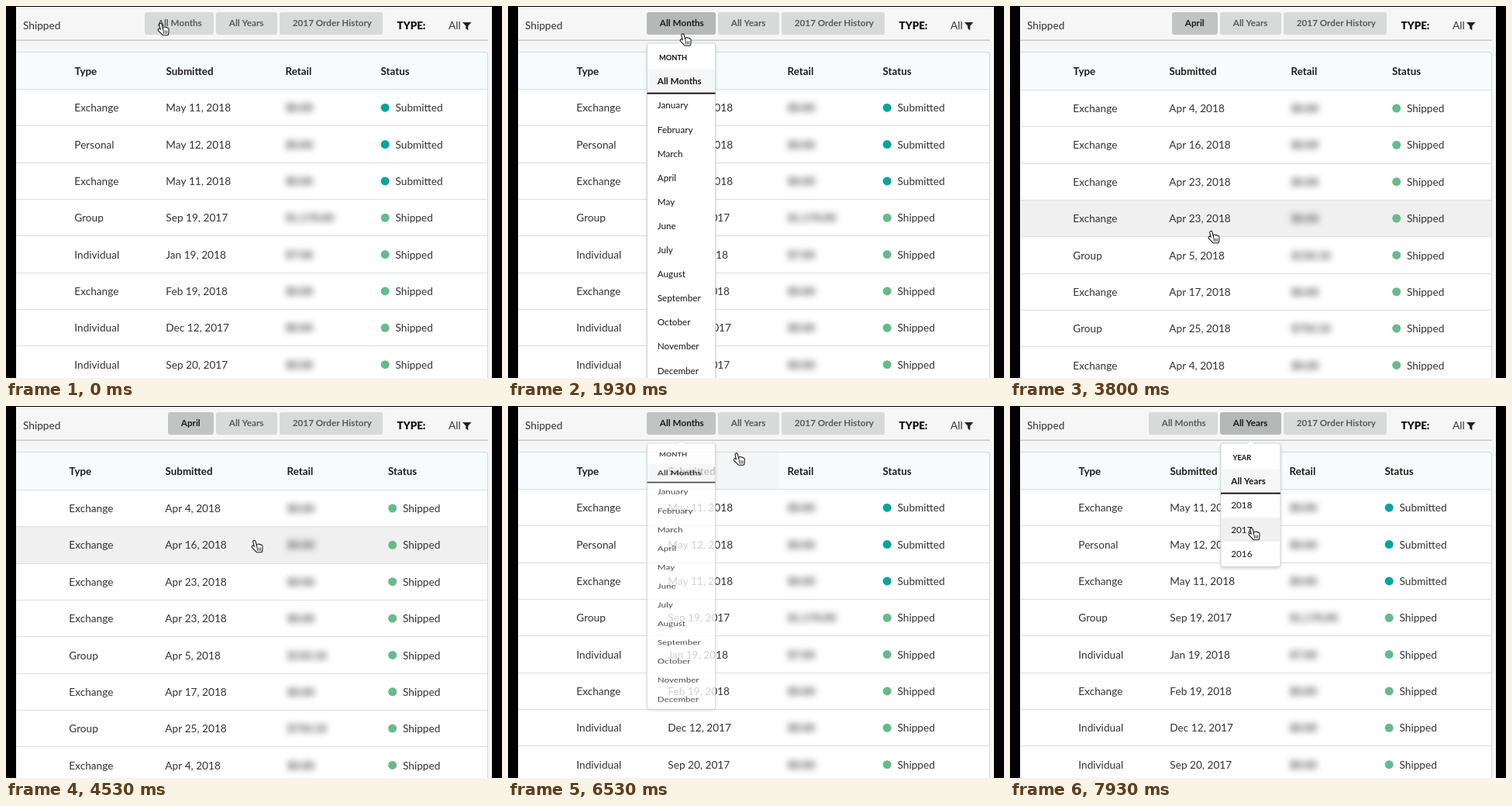
These frames come from a looping animation (640x480 px, 8 s). An HTML page with a canvas:

```html
<!DOCTYPE html>
<html lang="en">
<head>
<meta charset="utf-8">
<title>Order list filters</title>
<style>
  html, body { margin: 0; width: 100%; height: 100%; overflow: hidden; background: #000; }
  canvas { display: block; width: 640px; height: 480px; }
</style>
</head>
<body>
<canvas id="stage" width="640" height="480"></canvas>
<script>
const stage = document.getElementById('stage').getContext('2d');
const layer = document.createElement('canvas').getContext('2d');
layer.canvas.width = 640;
layer.canvas.height = 520;
let ctx = stage;

const LOOP = 8000;
const ROW = 47.35;
const ITEM = 31.1;
const MENU_TOP = 48;
const BODY = 13.66;
const SMALL = 11.7;
const MONTHS = ['All Months', 'January', 'February', 'March', 'April', 'May', 'June', 'July',
  'August', 'September', 'October', 'November', 'December'];
const YEARS = ['All Years', '2018', '2017', '2016'];

// Clicks that open and close a menu; the unfolding follows after a short delay
const ALL_MONTHS = { open: 1320, close: 3190 };
const APRIL = { open: 5340, close: 6467 };
const ALL_YEARS = { open: 6900, close: LOOP };
const DELAY = 35;
const FOLD = 250;

const order = line => line.split('|');
const allOrders = {
  cols: [89, 207, 361, 484], top: 107.5,
  rows: [
    'Exchange|May 11, 2018|$0.00|Submitted',
    'Personal|May 12, 2018|$0.00|Submitted',
    'Exchange|May 11, 2018|$0.00|Submitted',
    'Group|Sep 19, 2017|$1,170.00|Shipped',
    'Individual|Jan 19, 2018|$7.00|Shipped',
    'Exchange|Feb 19, 2018|$0.00|Shipped',
    'Individual|Dec 12, 2017|$0.00|Shipped',
    'Individual|Sep 20, 2017|$0.00|Shipped'
  ].map(order)
};
const aprilOrders = {
  cols: [82, 206, 363, 493.5], top: 108.3,
  rows: [
    'Exchange|Apr 4, 2018|$0.00|Shipped',
    'Exchange|Apr 16, 2018|$0.00|Shipped',
    'Exchange|Apr 23, 2018|$0.00|Shipped',
    'Exchange|Apr 23, 2018|$0.00|Shipped',
    'Group|Apr 5, 2018|$150.10|Shipped',
    'Exchange|Apr 17, 2018|$0.00|Shipped',
    'Group|Apr 25, 2018|$750.10|Shipped',
    'Exchange|Apr 4, 2018|$0.00|Shipped'
  ].map(order)
};

// Each move of the hand; it rests in between
const moves = [
  { from: 0, to: 0, x: 203, y: 30 },
  { from: 210, to: 520, x: 229, y: 32 },
  { from: 1820, to: 2590, x: 230, y: 238 },
  { from: 3610, to: 4000, x: 298, y: 362 },
  { from: 4000, to: 4530, x: 324, y: 181 },
  { from: 4650, to: 5320, x: 258, y: 37 },
  { from: 5660, to: 6110, x: 260, y: 100 },
  { from: 6430, to: 6540, x: 299, y: 68 },
  { from: 6540, to: 6780, x: 312, y: 32 },
  { from: 7270, to: 7920, x: 315, y: 165 }
];

const clamp = v => Math.max(0, Math.min(1, v));
const smooth = p => p * p * (3 - 2 * p);
const easeOut = p => 1 - (1 - p) ** 2;
const ramp = (t, from, span) => clamp((t - from) / span);
const isOpen = (t, menu) => t >= menu.open && t < menu.close;

// How far a menu is unfolded, 0 to 1
const unfold = (t, { open, close }) =>
  easeOut(ramp(t, open + DELAY, FOLD)) - easeOut(ramp(t, close + DELAY, FOLD));

function handAt(t) {
  return moves.reduce((at, { from, to, x, y }) => {
    const p = smooth(ramp(t, from, Math.max(1, to - from)));
    return { x: at.x + (x - at.x) * p, y: at.y + (y - at.y) * p };
  }, moves[0]);
}

// Grey level of a filter button: lighter at rest, darker when hovered, open or just pressed
function buttonShade(t, hoverFrom, hoverTo, menus) {
  const hover = ramp(t, hoverFrom, 200) - ramp(t, hoverTo, 150);
  const active = menus.find(menu => isOpen(t, menu));
  const press = active ? 1 - ramp(t, active.open, FOLD) : 0;
  return 216 - 22 * hover - (active ? 12 : 0) - 12 * press;
}

function text(str, x, y, size = BODY, color = '#333', weight = 400) {
  ctx.font = `${weight} ${size}px Lato, sans-serif`;
  ctx.fillStyle = color;
  ctx.fillText(str, x, y);
}

function rect(x, y, w, h, color) {
  ctx.fillStyle = color;
  ctx.fillRect(x, y, w, h);
}

function roundRect(x, y, w, h, r, color) {
  ctx.beginPath();
  ctx.roundRect(x, y, w, h, r);
  ctx.fillStyle = color;
  ctx.fill();
}

function button(label, x, w, shade = 216) {
  const ink = Math.max(25, 88 - (216 - shade) * 3);
  roundRect(x, 8, w, 29, 3, `rgb(${shade},${shade + 2},${shade + 2})`);
  text(label, x + 16.8, 25.5, SMALL, `rgb(${ink},${ink},${ink})`, 700);
}

function drawTopBar(t, filtered) {
  text('Shipped', 22, 30.3);
  const monthShade = buttonShade(t, 270, 6700, [ALL_MONTHS, APRIL]);
  if (filtered) button('April', 209, 59, monthShade);
  else button('All Months', 179, 89, monthShade);
  button('All Years', 271, 79, buttonShade(t, 6640, LOOP, [ALL_YEARS]));
  button('2017 Order History', 353, 133);
  text('TYPE:', 504.5, 30.3, 13.4, '#111', 900);
  text('All', 571, 30.3);
  ctx.fillStyle = '#222';
  ctx.fill(new Path2D('M589 21h11.5l-4.2 4.8v5.7l-3.1-2.5v-3.2z'));
  rect(13, 43.5, 609, 1.5, '#c9c9c9');
}

function drawTable({ cols, top, rows }, hot, menuOpen) {
  roundRect(5, 59, 617, 440, 4, '#d6d7d8');
  roundRect(5, 60, 616, 440, 4, '#fff');
  roundRect(5, 60, 616, top - 60, [4, 4, 0, 0], '#f8fbfd');
  const onDateHead = hot.y > 60 && hot.y < top && hot.x > 197 && hot.x < 350;
  if (!menuOpen && onDateHead) rect(197, 60, 153, top - 60, '#f4f5f6');
  ['Type', 'Submitted', 'Retail', 'Status']
    .forEach((label, i) => text(label, cols[i] - 0.5, 89, 13.4, '#1c1c1c', 700));

  const hovered = menuOpen ? -1 : Math.floor((hot.y - top) / ROW);
  rows.forEach(([type, date, price, status], i) => {
    const y = top + i * ROW;
    const base = y + 28.8;
    if (i === hovered) rect(13, y, 608, ROW, '#f0f0f0');
    rect(13, Math.round(y - 0.5), 608, 1, '#dededf');
    text(type, cols[0] - 0.7, base);
    text(date, cols[1] - 0.7, base);
    ctx.filter = 'blur(4px)';
    text(price, cols[2], base, BODY, '#444', 700);
    ctx.filter = 'none';
    ctx.beginPath();
    ctx.arc(cols[3] + 5.2, y + 23.7, 5.5, 0, 7);
    ctx.fillStyle = status === 'Shipped' ? '#66bb8b' : '#00a59f';
    ctx.fill();
    text(status, cols[3] + 18.5, base);
  });
}

function drawMenuBody(title, items, x, w, selected, hot) {
  const mid = x + w / 2;
  ctx.shadowColor = 'rgba(34,36,38,.22)';
  ctx.shadowBlur = 4;
  ctx.shadowOffsetY = 2;
  roundRect(x, 0, w, 35 + items.length * ITEM, 3, '#fff');
  ctx.shadowColor = 'transparent';
  ctx.strokeStyle = '#d2d3d4';
  ctx.stroke();
  const arrow = new Path2D(`M${mid - 4.5} .5l4.5 -4.5l4.5 4.5`);
  ctx.fillStyle = '#fff';
  ctx.fill(arrow);
  ctx.stroke(arrow);
  rect(mid - 4, -0.5, 8, 2, '#fff');

  text(title, x + 15.5, 22, 9.3, '#111', 700);
  const inside = hot.x > x && hot.x < x + w;
  const hovered = inside ? Math.floor((hot.y - MENU_TOP - 34) / ITEM) : -1;
  items.forEach((label, i) => {
    const y = 34 + i * ITEM;
    const chosen = i === selected;
    if (i === hovered) rect(x + 0.5, y, w - 1, ITEM, '#f0f0f0');
    else if (chosen) rect(x + 0.5, y, w - 1, ITEM, '#f6f6f6');
    if (chosen) rect(x, y + 29.7, w, 1.9, '#111');
    text(label, x + 13.3, y + 19.3, SMALL, '#151515', chosen ? 700 : 400);
  });
}

// The menu is painted on its own layer, so that it fades as one piece
function drawMenu(amount, ...menu) {
  if (amount <= 0) return;
  const margin = 10;
  ctx = layer;
  ctx.clearRect(0, 0, 640, 520);
  ctx.save();
  ctx.translate(0, margin);
  drawMenuBody(...menu);
  ctx.restore();
  ctx = stage;
  ctx.save();
  ctx.globalAlpha = amount;
  ctx.translate(0, MENU_TOP);
  ctx.scale(1, amount);
  ctx.drawImage(layer.canvas, 0, -margin);
  ctx.restore();
}

function drawHand({ x, y }) {
  const fingers = new Path2D(
    'M-3.6 -6L-1 4M1.2 -1.4L1.6 5M3.4 -1L3.6 5M5.4 0L5 6M-5.2 .8L0 6L5 6');
  const creases = new Path2D('M.4 2v3.6M2.5 2v3.6M4.5 2v3.6');
  const stroke = (path, width, color) => {
    ctx.lineWidth = width;
    ctx.strokeStyle = color;
    ctx.stroke(path);
  };
  ctx.save();
  ctx.translate(x, y);
  ctx.lineCap = ctx.lineJoin = 'round';
  stroke(fingers, 4.4, '#111');
  stroke(fingers, 2.3, '#fff');
  stroke(creases, 0.8, '#111');
  ctx.restore();
}

function draw(t) {
  const hand = handAt(t);
  const hot = { x: hand.x - 3, y: hand.y - 7 };
  const filtered = t >= ALL_MONTHS.close && t < APRIL.close;
  const menuOpen = [ALL_MONTHS, APRIL, ALL_YEARS].some(menu => isOpen(t, menu));

  rect(0, 0, 640, 480, '#000');
  ctx.save();
  ctx.beginPath();
  ctx.rect(13, 1, 614, 479);
  ctx.clip();
  rect(13, 1, 614, 479, '#f6f6f6');
  drawTable(filtered ? aprilOrders : allOrders, hot, menuOpen);
  drawTopBar(t, filtered);

  const months = unfold(t, ALL_MONTHS) + unfold(t, APRIL);
  if (filtered) drawMenu(months, 'MONTH', MONTHS, 209.5, 81, 4, hot);
  else drawMenu(months, 'MONTH', MONTHS, 179.5, 88, 0, hot);
  drawMenu(unfold(t, ALL_YEARS), 'YEAR', YEARS, 272, 77, 0, hot);
  drawHand(hand);
  ctx.restore();
}

const start = performance.now();
function tick() {
  draw((performance.now() - start) % LOOP);
  requestAnimationFrame(tick);
}
tick();
</script>
</body>
</html>
```
